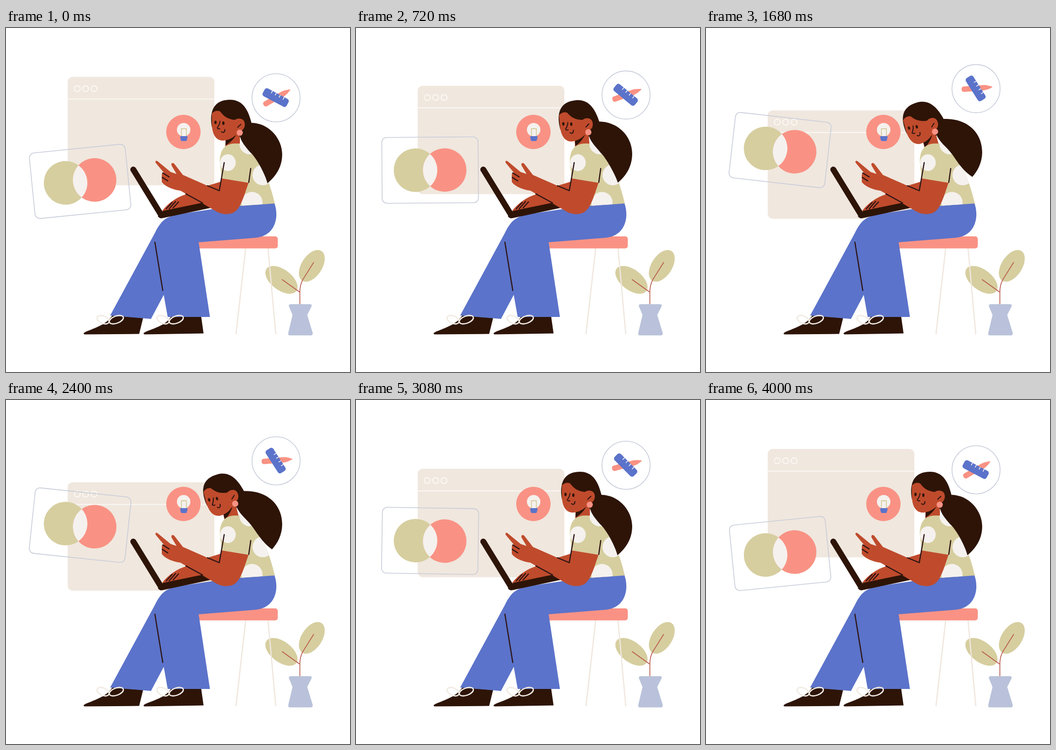
An HTML page that plays this animation: 700x700 px, repeating every 4040 ms.

```html
<!DOCTYPE html>
<html lang="en">
<head>
<meta charset="utf-8">
<title>Designer at work</title>
<style>
  html, body { margin: 0; width: 100%; height: 100%; overflow: hidden; background: #fff; }
  svg { display: block; width: 100%; height: 100%; }
  .dark { fill: #2d1407; }
  .skin { fill: #bf4b2c; }
  .blue { fill: #5b73ca; }
  .pink { fill: #f99284; }
  .olive { fill: #d6ce9f; }
  .pale { fill: #f5f1ee; }
  .sand { fill: #f0e7de; }
  .ink, .frame, .lace, .stem, .white { fill: none; stroke-linecap: round; stroke-linejoin: round; }
  .ink { stroke: #2d1414; stroke-width: 2.3; }
  .frame { stroke: #c8cdda; stroke-width: 1.6; }
  .lace { stroke: #f1ebe3; stroke-width: 2.6; }
  .stem { stroke: #b95a4c; stroke-width: 1.6; }
  .white { stroke: #fbf8f5; stroke-width: 2; }
</style>
</head>
<body>
<svg viewBox="0 0 700 700">
  <defs>
    <path id="shirtShape" d="M435 270C436 247 445 235 468 235C490 235 505 243 512 257C524 284 540 325 547 357L475 362L492 315L439 306Z"/>
    <clipPath id="shirtClip"><use href="#shirtShape"/></clipPath>
    <g id="laces" class="lace">
      <ellipse cx="197.5" cy="593.5" rx="13" ry="7.5" transform="rotate(24 197.5 593.5)"/>
      <ellipse cx="224.5" cy="593.5" rx="15" ry="7.3" transform="rotate(-20 224.5 593.5)"/>
    </g>
  </defs>

  <g id="browser">
    <rect class="sand" x="125.5" y="99.5" width="298.5" height="220.5" rx="10"/>
    <path class="white" d="M126 144.5H424"/>
    <g class="white">
      <circle cx="145" cy="123.5" r="6"/><circle cx="162" cy="123.5" r="6"/><circle cx="179.3" cy="123.5" r="6"/>
    </g>
  </g>

  <g id="idea">
    <circle class="pink" cx="361" cy="211.5" r="35"/>
    <circle class="pale" cx="361.5" cy="207" r="13.7"/>
    <path d="M357 221V205H367V221" fill="none" stroke="#d6ce9f" stroke-width="1.8"/>
    <path class="blue" d="M356 220H368Q370 220 369.5 222L368 228Q367.500 230 366 230H358Q356 230 355.700 228L354.500 222Q354 220 356 220Z"/>
  </g>

  <g id="card">
    <circle class="olive" cx="-29.7" r="44.3"/>
    <circle class="pink" cx="29.700" r="44.3"/>
    <path class="pale" d="M0-32.900A44.3 44.3 0 0 1 0 32.900A44.3 44.3 0 0 1 0-32.900Z"/>
    <rect class="frame" x="-98" y="-67" width="196" height="134" rx="10"/>
  </g>

  <g id="tools">
    <circle class="frame" r="49"/>
    <g id="pencil">
      <path class="pink" d="M-26-5.500H14C21-5 27-2.500 31.500-.8Q32 0 31 .7C26 3 21 5 14 5.500H-26Q-31 5.500-31 0Q-31-5.500-26-5.500Z"/>
    </g>
    <g id="ruler">
      <rect class="blue" x="-27.5" y="-9" width="55" height="18" rx="5"/>
      <path class="white" style="stroke-width:1.500" d="M-12-8.500V-4M-3-8.500V-4M6-8.500V-4M15-8.500V-4"/>
    </g>
  </g>

  <g id="plant">
    <ellipse class="olive" cx="560.5" cy="512.5" rx="38" ry="21" transform="rotate(37 560.5 512.5)"/>
    <ellipse class="olive" cx="622.300" cy="484" rx="36" ry="21" transform="rotate(-57 622.300 484)"/>
    <path class="stem" d="M562 512L597 537M626 477L604 512C599 521 598 530 598 537V562"/>
    <path fill="#b9c2da" d="M580 562H618Q624 562 621.500 567L613 584L624 620Q625 625.500 620 625.500H578Q573 625.500 574.500 620L583 584L576 567Q574 562 580 562Z"/>
  </g>

  <g id="stool">
    <path d="M488 446L468 623M533 446L549 623" fill="none" stroke="#f0e7de" stroke-width="2.500"/>
    <rect class="pink" x="380" y="424" width="173" height="24.500" rx="5"/>
  </g>

  <g id="legs">
    <path class="dark" d="M216 585L279 590L271 622.500L160 623.500C155 622 160 619 165 617C186 609 208 600 216 585Z"/>
    <path class="dark" d="M336 586H397L402 621.500L282 623.500C277 622 282 619 287 617C308 609 330 601 336 586Z"/>
    <path class="blue" d="M546 356C556 382 550 424 506 427L392 436L415 588H329L321 543L295 592L212 585L303 417C314 395 322 385 350 379L478 360Z"/>
    <path class="ink" d="M303 436L319 534"/>
    <use href="#laces"/><use href="#laces" x="122"/>
  </g>

  <g id="neck">
    <path class="skin" d="M447 215L446 248H476V210Z"/>
    <path class="dark" d="M447 227L468 218C463 227 455 234 447 239Z"/>
  </g>

  <g id="shirt">
    <use href="#shirtShape" class="olive"/>
    <g class="pale" clip-path="url(#shirtClip)">
      <ellipse cx="451.500" cy="274" rx="16" ry="17"/><circle cx="496" cy="236" r="21"/>
      <circle cx="522.500" cy="299" r="21"/><circle cx="500.500" cy="355" r="21.500"/>
    </g>
  </g>

  <path id="ponytail" class="dark"/>

  <g id="head">
    <path class="dark" d="M419 202C413 166 425 146 456 146C484 146 494 170 500 195L486 206L476 222L462 200Z"/>
    <path class="skin" d="M419 174C423 169 430 167 436 170C443 180 452 186 466 187C472 182 486 183 486 196C486 206 479 211 472 209C470 219 456 229 440 229C426 228 420 215 419 198Z"/>
    <path class="ink" style="stroke-width:2" d="M471.500 202L478 196M435.500 190C435 196 432 200 430 203Q431 206 435 205M438.500 211C442 214 445.500 212 445.500 206.500"/>
    <ellipse class="dark" cx="426.300" cy="192" rx="2.300" ry="3.600"/>
    <ellipse class="dark" cx="442.300" cy="193.700" rx="2.300" ry="3.600"/>
    <circle class="pink" cx="475.600" cy="213" r="6.300"/>
  </g>

  <g id="arms">
    <path class="skin" d="M317 373C330 356 347 344 368 338L410 321L436 313L440 345L415 358Z"/>
    <path class="ink" d="M326 368L338 355M332 368L345 353M340 366L351 354"/>
    <path d="M259 288L315.500 380" fill="none" stroke="#2d1407" stroke-width="12" stroke-linecap="round"/>
    <path class="dark" d="M309 383L320 372L405 354.500L426 364L318 387Q312 388 309 383Z"/>
    <path class="skin" d="M439 306L434 331L410 321L360 299L343 277C340 273 335 275 337 280L347 297L335 293L309 271.500C305 268.500 302 272 306 276L321 294Q317 294 317 299V313C322 321 338 329 355 331L424 371C436 379 450 381 462 376C474 370 479 356 485 340L493.500 315Z"/>
    <path class="ink" d="M319 295L332 303M318 304L329 311M366 337.500L400 356M444 274L434 331L410 321M498 286L494 314"/>
  </g>
</svg>

<script>
const LOOP = 4040, STEP = 40;
const $ = id => document.getElementById(id);
const place = (id, value) => $(id).setAttribute('transform', value);
const mix = (a, b, k) => a + (b - a) * k;

// Swings 0 -> 1 -> 0 once per loop.
const swing = t => (1 - Math.cos(t / LOOP * 2 * Math.PI)) / 2;

const smooth = (t, from, to) => {
  const k = Math.min(1, Math.max(0, (t - from) / (to - from)));
  return k * k * (3 - 2 * k);
};

// Smooth curve through [time, value] points, at rest at both ends.
function track(points, t) {
  const last = points.length - 1;
  const slope = i => i === 0 || i === last ? 0 :
    (points[i + 1][1] - points[i - 1][1]) / (points[i + 1][0] - points[i - 1][0]);
  let i = 0;
  while (i < last - 1 && t >= points[i + 1][0]) i++;
  const [t0, v0] = points[i], [t1, v1] = points[i + 1];
  const h = t1 - t0, k = (t - t0) / h, e = k * k * (3 - 2 * k);
  return mix(v0, v1, e) + h * k * (1 - k) * ((1 - k) * slope(i) - k * slope(i + 1));
}

const browserDrop = [[0, 0], [720, 18], [1120, 46.3], [1680, 68.3], [2000, 72],
  [2400, 68], [2800, 54], [3080, 40.5], [LOOP, 0]];
const cardTilt = [[0, -5.75], [720, -0.4], [1120, 2.4], [1680, 6.5], [1960, 8.2],
  [2400, 6], [3080, 0.9], [LOOP, -5.75]];

const hairUp = [472,200, 499,193, 535,193,562,225,562,257, 562,283,549,302,532,316,
  527,296,508,262,497,253, 488,242,478,232,476,219];
const hairDown = [462,195, 484,185, 528,183,562,210,562,253, 562,273,553,291,542,303,
  520,289,508,266,500,256, 490,242,474,232,468,215];

function ponytail(nod) {
  const p = hairUp.map((v, i) => mix(v, hairDown[i], i > 9 && i < 18 ? nod * nod : nod));
  return `M${p.slice(0, 2)}L${p.slice(2, 4)}C${p.slice(4)}Z`;
}

function draw(t) {
  place('browser', `translate(0 ${track(browserDrop, t)})`);
  place('card', `translate(150.8 ${312.5 - 66.5 * swing(t + 95)}) rotate(${track(cardTilt, t)})`);

  const turn = swing(t) ** 0.8;
  place('tools', `translate(549.5 ${142 - 20 * swing(t)})`);
  place('pencil', `translate(1.5 -0.8) rotate(${mix(-30, -3, turn)})`);
  place('ruler', `translate(-0.8 -0.4) rotate(${mix(28, 59.5, turn)})`);

  const nod = smooth(t, 560, 1000) - smooth(t, 2350, 2800);
  const tilt = `rotate(${-15.2 * nod} 463.2 247.6)`;
  place('neck', tilt);
  place('head', tilt);
  $('ponytail').setAttribute('d', ponytail(nod));
}

const start = performance.now();
function tick() {
  const t = (performance.now() - start) % LOOP;
  draw(Math.floor(t / STEP) * STEP);
  requestAnimationFrame(tick);
}
tick();
</script>
</body>
</html>
```
